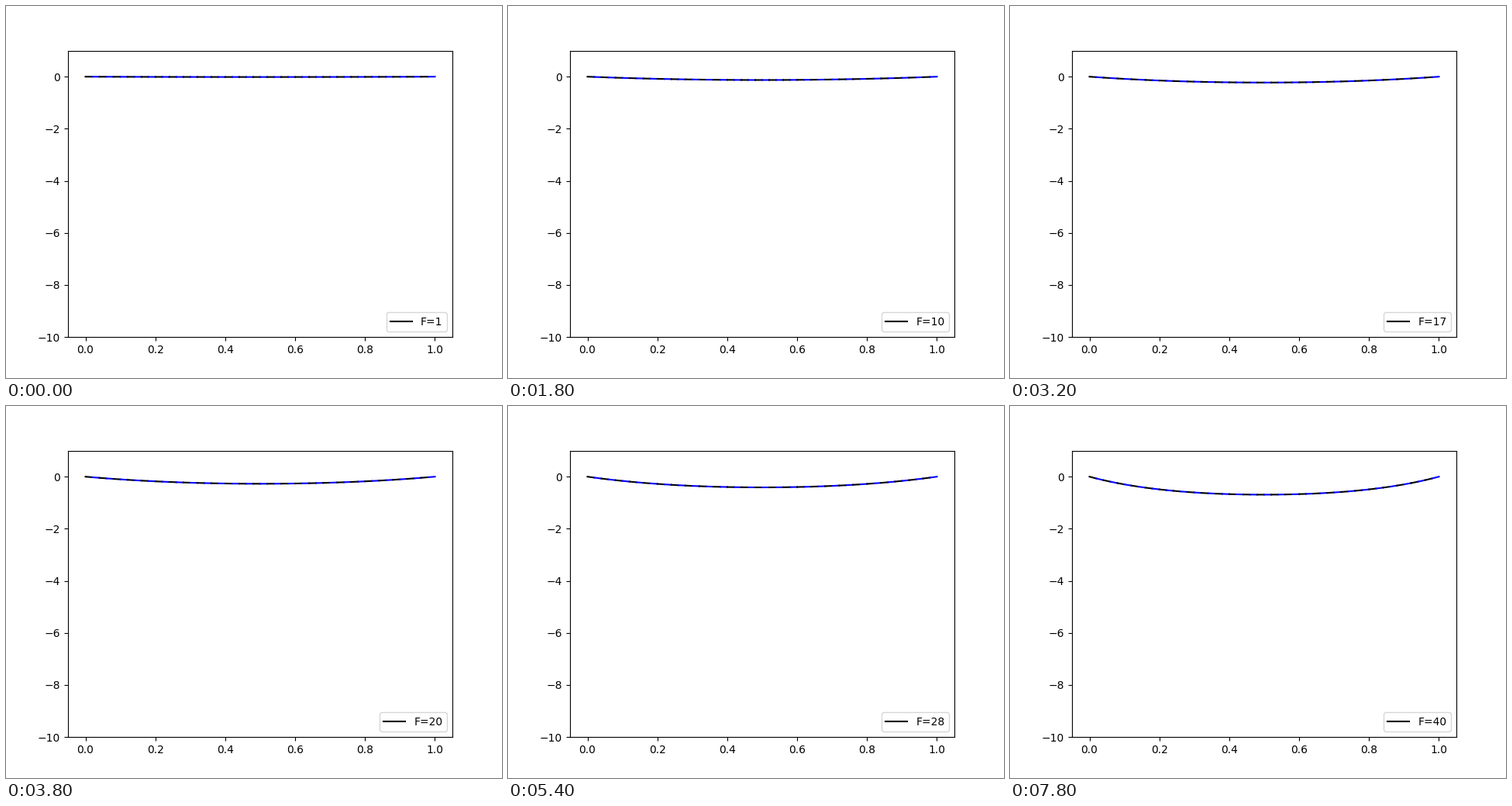
A matplotlib script for the animation above (8000 ms loop, 640 by 480 pixels).

```python
import numpy as np
import matplotlib.pyplot as plt
from matplotlib.animation import FuncAnimation

FRAMES = 40
INTERVAL = 200
SEGMENTS = 50
TENSION = 10

fig, ax = plt.subplots(figsize=(6.4, 4.8), dpi=100)
x = np.linspace(0, 1, SEGMENTS + 1)


def sag(load):
    """Catenary hung between (0, 0) and (1, 0)."""
    k = load / TENSION
    return (np.cosh(k * (x - 0.5)) - np.cosh(k / 2)) / k


# The cable is a chain of short pieces in alternating colours.
pieces = [
    ax.plot(x[i:i + 2], [0, 0], color="blue" if i % 2 else "black", lw=1.5)[0]
    for i in range(SEGMENTS)
]
ax.set_xlim(-0.05, 1.05)
ax.set_ylim(-10, 1)
legend = ax.legend([pieces[0]], ["F=1"], loc="lower right")
label = legend.get_texts()[0]


def update(frame):
    load = frame + 1
    y = sag(load)
    for i, piece in enumerate(pieces):
        piece.set_ydata(y[i:i + 2])
    label.set_text(f"F={load}")
    return [*pieces, legend]


anim = FuncAnimation(fig, update, frames=FRAMES, interval=INTERVAL,
                     repeat=True, repeat_delay=0, blit=False)
plt.show()
```
